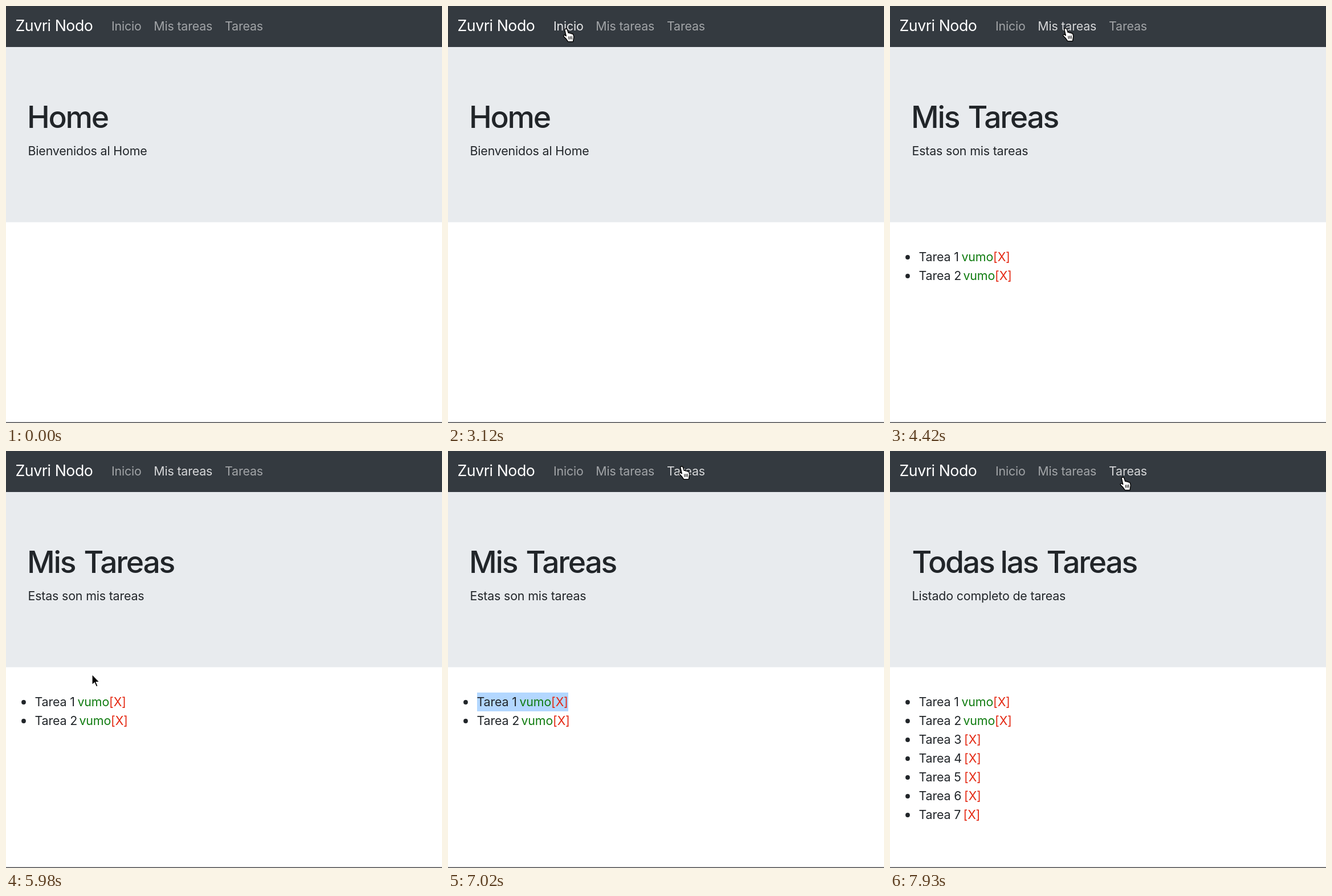
Write an HTML page that moves like this. It is 765 px wide and 732 px high and loops after 8 s.

```html
<!DOCTYPE html>
<html lang="es">
<head>
<meta charset="utf-8">
<title>Tareas</title>
<style>
  html, body { margin: 0; width: 100%; height: 100%; overflow: hidden; background: #fff; }
  svg { display: block; width: 100vw; height: 100vh; }
  text {
    font-family: Inter, Roboto, sans-serif;
    font-size: 21.4px;
    font-weight: 440;
    letter-spacing: -.17px;
    font-optical-sizing: none;
    fill: #212529;
    white-space: pre;
  }
  #brand { font-size: 26.8px; letter-spacing: -.5px; fill: #fff; }
  #title text { font-size: 53.4px; font-weight: 530; letter-spacing: -2.2px; }
  #nav text { fill: #fff; }
  .owner { fill: #107c10; }
  .remove { fill: #e42812; }
</style>
</head>
<body>
<svg viewBox="0 0 765 732">
  <rect width="765" height="732" fill="#fff"/>
  <rect width="765" height="72" fill="#343a40"/>
  <rect y="72" width="765" height="307.5" fill="#e8ebee"/>
  <rect y="730.5" width="765" height="1.5" fill="#4c4c4f"/>
  <text id="brand" x="16.5" y="44">Zuvri Nodo</text>
  <g id="nav"></g>
  <g id="title"></g>
  <text id="lead" x="38.5" y="262"></text>
  <rect id="selection" x="51" y="424" width="160" height="33" fill="#b3d7ff"/>
  <g id="list"></g>
  <g id="cursor">
    <path id="arrow" transform="scale(1.08)" d="M0 0V17L4 13.6 6.8 20.2 9.4 19.1 6.6 12.6H12Z" fill="#000" stroke="#fff" stroke-width="1.1"/>
    <g id="hand" transform="translate(-7 -1) scale(1.1)" stroke="#000" stroke-linejoin="round" stroke-linecap="round">
      <path d="M4.6 1.1Q6.8 .4 7.6 2.6L9.3 7.6Q11 6.6 12 8.2 13.7 7.4 14.6 9 16.6 8.5 17.2 10.5 18.7 14 17.5 17L16.8 21.5H8.8Q5.8 16.4 1.9 13.3 .9 11.2 3.2 10.8L5.7 12.4 3.5 3Q3.3 1.6 4.6 1.1Z" fill="#fff" stroke-width="1.3"/>
      <path d="M9.8 13.4L10.3 17.4M12.2 13.2L12.6 17.3M14.6 13L14.8 17.2" fill="none"/>
    </g>
    <path id="beam" d="M-3 -9Q0 -9 0 -6V6Q0 9 -3 9M3 -9Q0 -9 0 -6M0 6Q0 9 3 9M-2 3H2" fill="none" stroke="#222" stroke-width="1.2"/>
  </g>
</svg>
<script>
const LOOP = 8000, STEP = 130;
const $ = id => document.getElementById(id);

function make(tag, attrs, parent, content) {
  const el = document.createElementNS('http://www.w3.org/2000/svg', tag);
  for (const key in attrs) el.setAttribute(key, attrs[key]);
  if (content) el.textContent = content;
  return parent.appendChild(el);
}

// label, x, highlighted from, until, opacity while highlighted
const links = [
  ['Inicio', 185, 3120, 4290, .9],
  ['Mis tareas', 259.3, 4030, 6370, .8],
  ['Tareas', 384, 7020, LOOP, .8]
].map(([label, x, from, to, glow]) =>
  ({ el: make('text', { x, y: 42.5 }, $('nav'), label), from, to, glow }));

const pages = [
  { from: 0, words: [['Home', 37]], lead: 'Bienvenidos al Home', rows: 0 },
  { from: 4290, words: [['Mis', 37], ['Tareas', 136.5]], lead: 'Estas son mis tareas', rows: 2 },
  { from: 7670, words: [['Todas', 38.5], ['las', 193.5], ['Tareas', 274.5]], lead: 'Listado completo de tareas', rows: 7 }
];
for (const page of pages) {
  page.el = make('g', {}, $('title'));
  for (const [word, x] of page.words) make('text', { x, y: 213.5 }, page.el, word);
}

const rows = Array.from({ length: 7 }, (_, i) => {
  const row = make('g', { transform: `translate(0 ${448 + 33 * i})` }, $('list'));
  const shift = i ? 3 : 0;
  make('circle', { cx: 31, cy: -7, r: 3.9, fill: '#212529' }, row);
  make('text', { x: 50.5 }, row, 'Tarea ' + (i + 1));
  if (i < 2) make('text', { x: 125.5 + shift, class: 'owner' }, row, 'vumo');
  make('text', { x: i < 2 ? 181 + shift : i === 6 ? 128.5 : 130, class: 'remove' }, row, '[X]');
  return row;
});

// time, x, y, pointer shape from this moment on
const path = [
  [780, 567, 712, 'arrow'],
  [1560, 409, 302, 'arrow'],
  [2600, 409, 302, 'arrow'],
  [3120, 208, 40, 'hand'],
  [3510, 212, 36, 'hand'],
  [3640, 222, 36, 'hand'],
  [3900, 279, 37, 'arrow'],
  [4030, 300, 39, 'hand'],
  [4420, 309, 39, 'hand'],
  [5070, 309, 39, 'hand'],
  [5200, 296, 64, 'arrow'],
  [5720, 112, 455, 'beam'],
  [5850, 140, 410, 'arrow'],
  [5980, 151, 392, 'arrow'],
  [6240, 104, 441, 'beam'],
  [6630, 104, 441, 'beam'],
  [6760, 190, 300, 'arrow'],
  [7020, 411, 27, 'hand'],
  [7540, 411, 35, 'hand'],
  [7800, 411, 35, 'hand'],
  [7930, 409.5, 46, 'hand']
];

const show = (el, on) => el.setAttribute('display', on ? 'inline' : 'none');

function pointerAt(t) {
  const i = path.findLastIndex(key => key[0] <= t);
  if (i < 0) return null;
  const a = path[i], b = path[i + 1] || a;
  const u = b === a ? 0 : (t - a[0]) / (b[0] - a[0]);
  const e = i === 0 ? 1 - (1 - u) ** 2 : u * u * (3 - 2 * u);
  return { x: a[1] + (b[1] - a[1]) * e, y: a[2] + (b[2] - a[2]) * e, shape: a[3] };
}

function draw(now) {
  const t = Math.floor((now % LOOP) / STEP) * STEP;

  const page = pages.findLast(p => p.from <= t);
  for (const p of pages) show(p.el, p === page);
  $('lead').textContent = page.lead;
  rows.forEach((row, i) => show(row, i < page.rows));
  show($('selection'), t >= 6370 && t < 7670);

  for (const { el, from, to, glow } of links)
    el.setAttribute('fill-opacity', t >= from && t < to ? glow : .54);

  const pointer = pointerAt(t);
  show($('cursor'), pointer);
  if (pointer) {
    $('cursor').setAttribute('transform', `translate(${pointer.x.toFixed(1)} ${pointer.y.toFixed(1)})`);
    for (const shape of ['arrow', 'hand', 'beam']) show($(shape), shape === pointer.shape);
  }
}

const start = performance.now();
function tick() {
  draw(performance.now() - start);
  requestAnimationFrame(tick);
}
tick();
</script>
</body>
</html>
```
